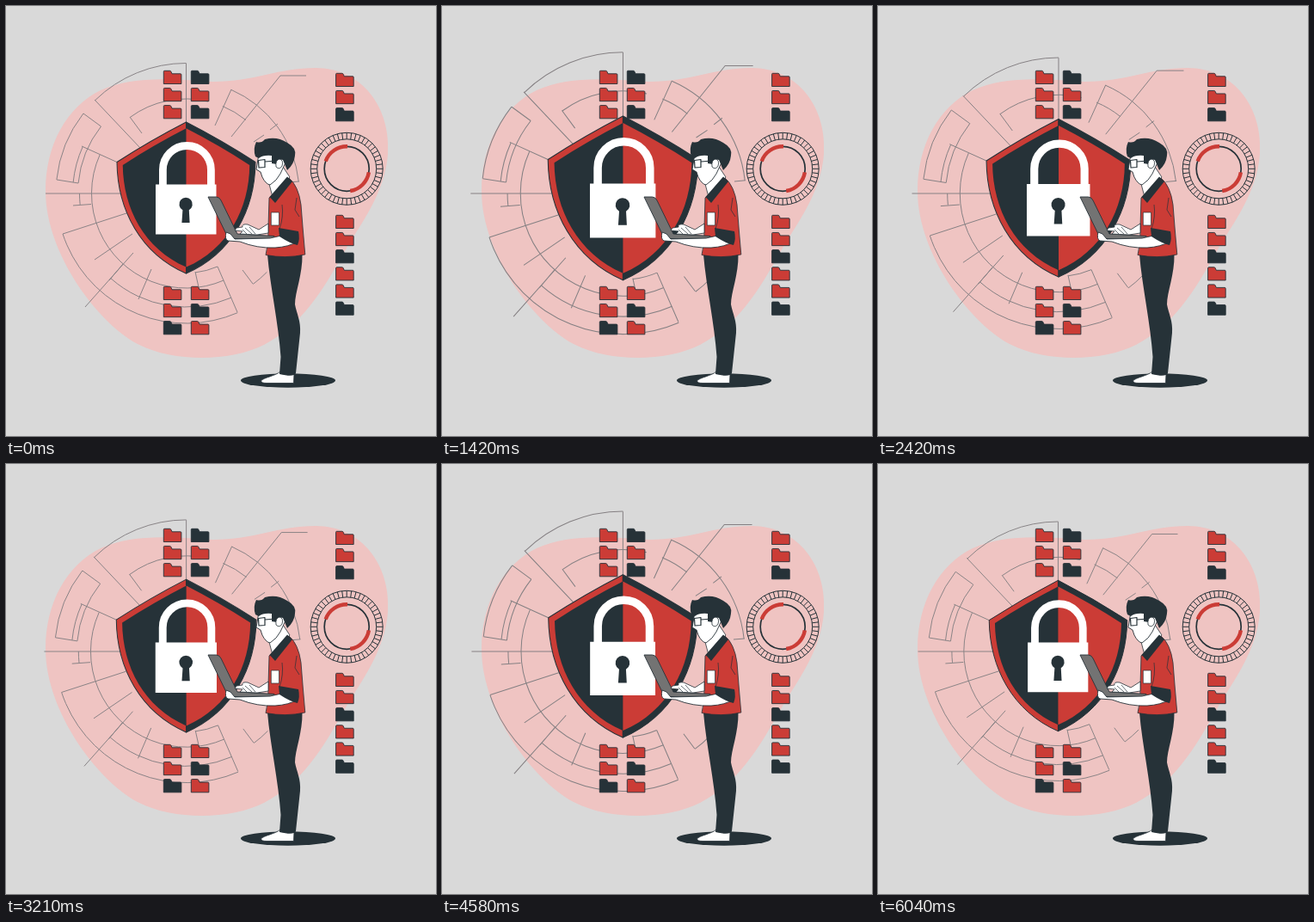
These frames come from a looping animation (500 by 500 pixels, 6.08 s). An HTML page with a canvas:

```html
<!DOCTYPE html>
<html lang="en">
<head>
<meta charset="utf-8">
<title>Security shield</title>
<style>
html, body { margin: 0; width: 100%; height: 100%; overflow: hidden; background: #d9d9d9; }
canvas { display: block; width: 500px; height: 500px; }
</style>
</head>
<body>
<canvas id="stage" width="500" height="500"></canvas>
<script>
const ctx = document.getElementById('stage').getContext('2d');
const LOOP = 6080, PHASE = 60;
const RED = '#cb3c36', DARK = '#263238', PINK = '#efc4c2', LINE = '#858083', GRAY = '#737373';
const PIVOT = { x: 198, y: 218 };
const HUB = { x: 209.5, y: 218 };
const REST = 1.005; // scale at which the shield group is laid out

function shape(d, fill, stroke, width = 1) {
  const p = new Path2D(d);
  if (fill) { ctx.fillStyle = fill; ctx.fill(p); }
  if (stroke) { ctx.strokeStyle = stroke; ctx.lineWidth = width; ctx.stroke(p); }
}

function arc(x, y, r, from, to, color, width) {
  ctx.beginPath();
  ctx.arc(x, y, r, from, to);
  ctx.strokeStyle = color;
  ctx.lineWidth = width;
  ctx.stroke();
}

// Clockwise arc around the hub between the bearings of two points
function ring(r, x1, y1, x2, y2) {
  const angle = (x, y) => Math.atan2(y - HUB.y, x - HUB.x);
  arc(HUB.x, HUB.y, r, angle(x1, y1), angle(x2, y2), LINE, 0.95);
}

function drawBlob() {
  shape('M46 215C46 161 71 117 110 98C145 82 185 84 240 88C290 88 315 72 360 72' +
    'C415 72 448 120 444 172C441 215 415 250 398 278C375 318 350 368 300 394' +
    'C260 414 195 414 155 394C110 372 46 290 46 215Z', PINK);
}

function drawWeb() {
  shape('M209.5 66.7V140M103 109L156 165M144 129L158 148M262 97L243 139' +
    'M349 81H319L262 152M316 137L307 144M288 158L300 150' +
    'M329 205L341 204M90 125L110.5 140M59 202L84 206M88 163L130 182' +
    'M46 218H135M78 232L99 230.5M66 265L140 241M103 295L147 265M120 319L136 300' +
    'M92 350L148 287M154 341L169 306M246 303L269 356M220 309L224 327M275 307L287 323',
    null, LINE, 0.95);
  ring(151.5, 103, 109, 209.5, 66);
  ring(110, 144, 129, 235, 111);
  ring(110, 252, 116, 279, 132);
  ring(131.5, 262, 97, 341, 204);
  ring(151.5, 59, 202, 90, 125);
  ring(126, 84, 206, 110.5, 140);
  ring(132, 78, 205, 88, 163);
  ring(124, 85, 231, 85, 218);
  ring(110, 254, 321, 109, 173);
  ring(151, 269, 356, 66, 265);
  ring(132, 262, 339, 120, 319);
  ring(92.5, 246, 303, 220, 309);
  ring(131, 303, 309, 287, 323);
}

function drawShield() {
  const outline = 'M0 135Q41 156 80.5 181.5C80 237 53 288 0 311Z';
  const half = (sign, outer, inner) => {
    ctx.save();
    ctx.translate(HUB.x, 0);
    ctx.scale(sign, 1);
    shape(outline, outer, DARK, 1);
    ctx.translate(0, 222);
    ctx.scale(0.916, 0.916);
    ctx.translate(0, -222);
    shape(outline, inner);
    ctx.restore();
  };
  half(-1, RED, DARK);
  half(1, DARK, RED);
  shape('M182.4 209V190.5a28 28 0 0 1 56 0V209', null, '#fff', 8.8);
  shape('M174 207.5H244.5V265.5H174Z', '#fff');
  shape('M205.4 237.2A7.7 7.7 0 1 1 212.8 237.2L213.6 252H204.4Z', DARK);
}

function folder(x, y, color) {
  shape(`M${x} ${y + 1}q0 -1 1 -1h6.2q1 0 1.5 1.2l1 2.3h9.9q1 0 1 1v10.7h-20.6Z`, color, DARK, 0.9);
}

function drawFolders() {
  const column = (x, y, code) => [...code].forEach((c, i) =>
    folder(x, y + i * 20.15, c === 'r' ? RED : DARK));
  column(183.3, 75.3, 'rrr');
  column(215.3, 75.3, 'drd');
  column(183.3, 326.3, 'rrd');
  column(215.3, 326.3, 'rdr');
  column(383.6, 78.3, 'rrd');
  column(383.6, 243.3, 'rrdrrd');
}

function drawGauge() {
  const x = 396.2, y = 189.3, ticks = 48;
  arc(x, y, 42, 0, 7, DARK, 1);
  arc(x, y, 34.5, 0, 7, DARK, 1);
  ctx.beginPath();
  for (let i = 0; i < ticks; i++) {
    const a = i / ticks * Math.PI * 2, c = Math.cos(a), s = Math.sin(a);
    ctx.moveTo(x + c * 34.5, y + s * 34.5);
    ctx.lineTo(x + c * 42, y + s * 42);
  }
  ctx.stroke();
  arc(x, y, 26, 0, 7, DARK, 1.7);
  arc(x, y, 26, Math.PI * 1.11, Math.PI * 1.51, RED, 4.4);
  arc(x, y, 26, Math.PI * 0.05, Math.PI * 0.45, RED, 4.4);
}

function drawLegs() {
  ctx.beginPath();
  ctx.ellipse(328, 435.5, 55, 8.2, 0, 0, 7);
  ctx.fillStyle = DARK;
  ctx.fill();
  shape('M319 425C314 430 299 432 296.5 436Q297 438.5 303 438.5H334.5L335 428Z', '#fff', DARK, 0.8);
  shape('M304 289H344.5C345 312 336 333 336 347C338 358 343 366 342 380' +
    'Q340 399 337 427Q335 432 318 428L319.5 408C317 370 307 325 304 289Z', DARK);
}

function drawHead() {
  shape('M313 181L322 187L330 199L310 222L306 207Z', '#fff', DARK, 0.8);
  shape('M294 172L291 190L296 193L298 199Q302 207 307 208Q315 203 319 195L326 180L316 168Z', '#fff', DARK, 0.9);
  shape('M290 175Q287 166 291 158Q297 160 301 155Q315 151 327 159Q338 165 336 174' +
    'Q335 184 327 191L322 179Q316 177 315 184L309 183V174Q299 173 294 177Z', DARK);
  shape('M314 187Q313 179 318 178Q323 179 321 186Q318 191 314 187Z', '#fff', DARK, 0.8);
  shape('M293.5 179.5L301 178.5V187.5L294 188ZM301 181L314 180', null, DARK, 1.2);
}

function drawTorso() {
  shape('M329 200Q340 209 343 231Q345 258 347.8 289Q325 294 302 289.5' +
    'Q306 274 305 257L306 223Z', RED, DARK, 0.8);
  shape('M306.5 222L327 198.5L333 204L313 229Z', DARK);
  shape('M308.3 240H317.5V255H308.3Z', '#fff', DARK, 0.7);
  shape('M338 223L336 237L341 245M321 231Q323 245 318 259', null, DARK, 0.7);
}

function drawLaptop() {
  shape('M235 222H244.5Q248 222 250 226L269 265L312 267.5V270.5H262L256 265Z', GRAY, DARK, 0.9);
  shape('M305 253L294 260L281 254Q274 253 275 257L268 258L266 261L275 262L272 265L292 266L305 264Z', '#fff', DARK, 0.8);
  shape('M278 258L286 265M275 260L280 265M283 257L290 265', null, DARK, 0.7);
  shape('M256 263Q254 271 258 273L272 274Q292 282 313 281Q329 280 339 274L332 264' +
    'Q321 267 307 270L266 271L261 265Z', '#fff', DARK, 0.9);
  shape('M317 258L340 262Q342 271 339 278Q330 276 318 268Z', DARK);
}

// Fast swell, slow return, then a fast swell and a fast return
function pulse(t) {
  const u = (t + PHASE) % LOOP / LOOP * 5;
  if (u < 1) return 1 + 0.1 * u;
  if (u < 3) return 1.1 - 0.05 * (u - 1);
  return 1 + 0.1 * (1 - Math.abs(u - 4));
}

function draw(t) {
  ctx.fillStyle = '#d9d9d9';
  ctx.fillRect(0, 0, 500, 500);
  const k = pulse(t) / REST;
  const scaled = paint => {
    ctx.save();
    ctx.translate(PIVOT.x, PIVOT.y);
    ctx.scale(k, k);
    ctx.translate(-PIVOT.x, -PIVOT.y);
    paint();
    ctx.restore();
  };
  ctx.lineJoin = 'round';
  drawBlob();
  scaled(drawWeb);
  drawFolders();
  drawGauge();
  scaled(drawShield);
  drawLegs();
  drawHead();
  drawTorso();
  drawLaptop();
}

const start = performance.now();
function tick() {
  draw((performance.now() - start) % LOOP);
  requestAnimationFrame(tick);
}
tick();
</script>
</body>
</html>
```
